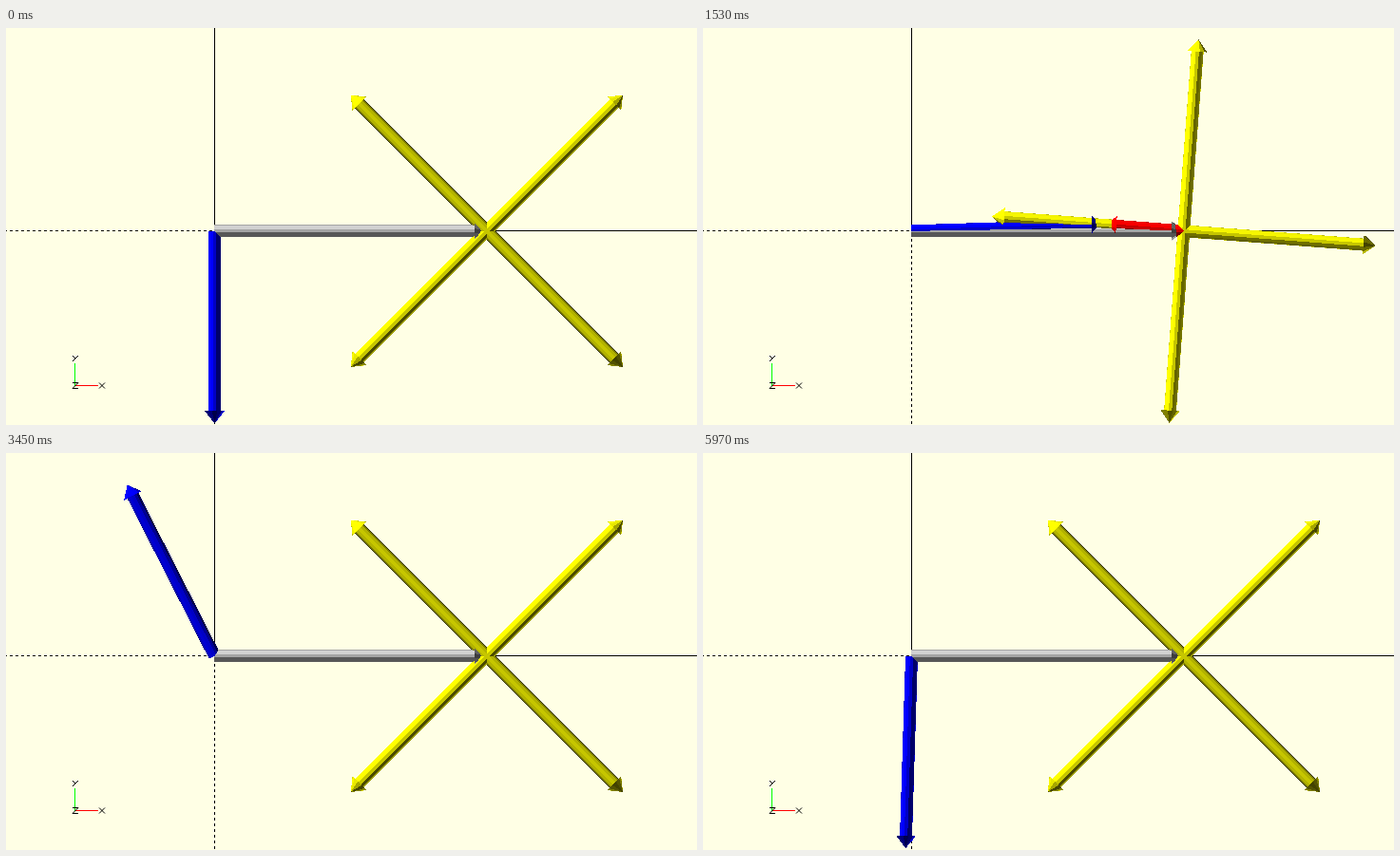
Animation of 727x418 px, one loop 6000 ms. Source, as an HTML page with a canvas:

```html
<!DOCTYPE html>
<html lang="en">
<head>
<meta charset="utf-8">
<title>Four-slot indexing mechanism</title>
<style>
  html, body { margin: 0; width: 100%; height: 100%; overflow: hidden; background: #ffffe5; }
  canvas { display: block; }
</style>
</head>
<body>
<canvas id="stage" width="727" height="418"></canvas>
<script>
const W = 727, H = 418;
const ctx = document.getElementById('stage').getContext('2d');

const OX = 219.5, OY = 213.8;          // crank centre
const CRANK = 202.5, GAP = CRANK * Math.SQRT2;
const SHAFT_R = 6.5, HEAD_R = 10.4, HEAD_L = 13;
const FACET = Math.PI / 6;
const LIGHT = 1 / Math.sqrt(3);        // light comes from (-1, 1, 1)
const RAD = Math.PI / 180;

const GREY = [211, 211, 211], BLUE = [0, 0, 255], RED = [255, 0, 0], YELLOW = [255, 255, 0];

const depth = new Float32Array(W * H);

function paintBackdrop() {
  ctx.fillStyle = '#ffffe5';
  ctx.fillRect(0, 0, W, H);
  ctx.fillStyle = '#000';
  ctx.fillRect(219, 0, 1, 214);
  ctx.fillRect(219, 213, W - 219, 1);
  for (let d = 3; d < 222; d += 6) {
    ctx.fillRect(217 - d, 213, 3, 1);
    ctx.fillRect(219, 213 + d, 1, 3);
  }
  // axis marker
  ctx.fillStyle = '#f00';
  ctx.fillRect(72, 376, 25, 1);
  ctx.fillStyle = '#0f0';
  ctx.fillRect(72, 353, 1, 24);
  ctx.strokeStyle = '#000';
  ctx.stroke(new Path2D(
    'M98 373.5L104 379.5M104 373.5L98 379.5' +
    'M76 345L70 351M70 345L73 348' +
    'M70 373.5H76L70 379.5H76'));
  return ctx.getImageData(0, 0, W, H);
}

const backdrop = paintBackdrop();
const frame = ctx.createImageData(W, H);

// Shaded 3D arrow seen from above; y of the direction points up.
function arrow(x, y, angle, length, color, lift = 0) {
  const dx = Math.cos(angle), dy = Math.sin(angle);
  const ex = x + dx * length, ey = y - dy * length;
  const x0 = Math.max(0, Math.floor(Math.min(x, ex) - HEAD_R));
  const x1 = Math.min(W - 1, Math.ceil(Math.max(x, ex) + HEAD_R));
  const y0 = Math.max(0, Math.floor(Math.min(y, ey) - HEAD_R));
  const y1 = Math.min(H - 1, Math.ceil(Math.max(y, ey) + HEAD_R));
  const slant = Math.hypot(HEAD_R, HEAD_L);

  for (let py = y0; py <= y1; py++) {
    for (let px = x0; px <= x1; px++) {
      const rx = px + 0.5 - x, ry = y - py - 0.5;
      const along = rx * dx + ry * dy, side = ry * dx - rx * dy;
      if (along < 0 || along > length) continue;
      const head = along > length - HEAD_L;
      const r = head ? HEAD_R * (length - along) / HEAD_L : SHAFT_R;
      if (Math.abs(side) >= r) continue;

      const z = Math.sqrt(r * r - side * side) + lift;
      const i = py * W + px;
      if (z <= depth[i]) continue;
      depth[i] = z;

      const phi = Math.round(Math.asin(side / r) / FACET) * FACET;
      const radial = Math.sin(phi) * (dx + dy) + Math.cos(phi);
      const lit = head
        ? (radial * HEAD_L + (dy - dx) * HEAD_R) / slant
        : radial;
      const shade = Math.min(1, 0.2 + Math.abs(lit) * LIGHT);
      for (let c = 0; c < 3; c++) frame.data[i * 4 + c] = color[c] * shade;
    }
  }
}

function draw(step) {
  frame.data.set(backdrop.data);
  depth.fill(0);

  const crank = (step * 1.8 - 90) * RAD;
  const engaged = step >= 25 && step <= 75;
  const pinX = CRANK * Math.cos(crank) - GAP, pinY = CRANK * Math.sin(crank);
  const wheel = engaged ? Math.atan2(pinY, pinX) : 45 * RAD;

  arrow(OX, OY, 0, GAP, GREY);
  arrow(OX, OY, crank, CRANK, BLUE);
  for (let k = 0; k < 4; k++) {
    arrow(OX + GAP, OY, wheel + k * Math.PI / 2, CRANK, YELLOW);
  }
  if (engaged) arrow(OX + GAP, OY, wheel, Math.hypot(pinX, pinY), RED, 0.02);
  ctx.putImageData(frame, 0, 0);
}

const start = performance.now();
let last = -1;
function tick() {
  const step = Math.floor((performance.now() - start) % 6000 / 30);
  if (step !== last) draw(last = step);
  requestAnimationFrame(tick);
}
tick();
</script>
</body>
</html>
```
